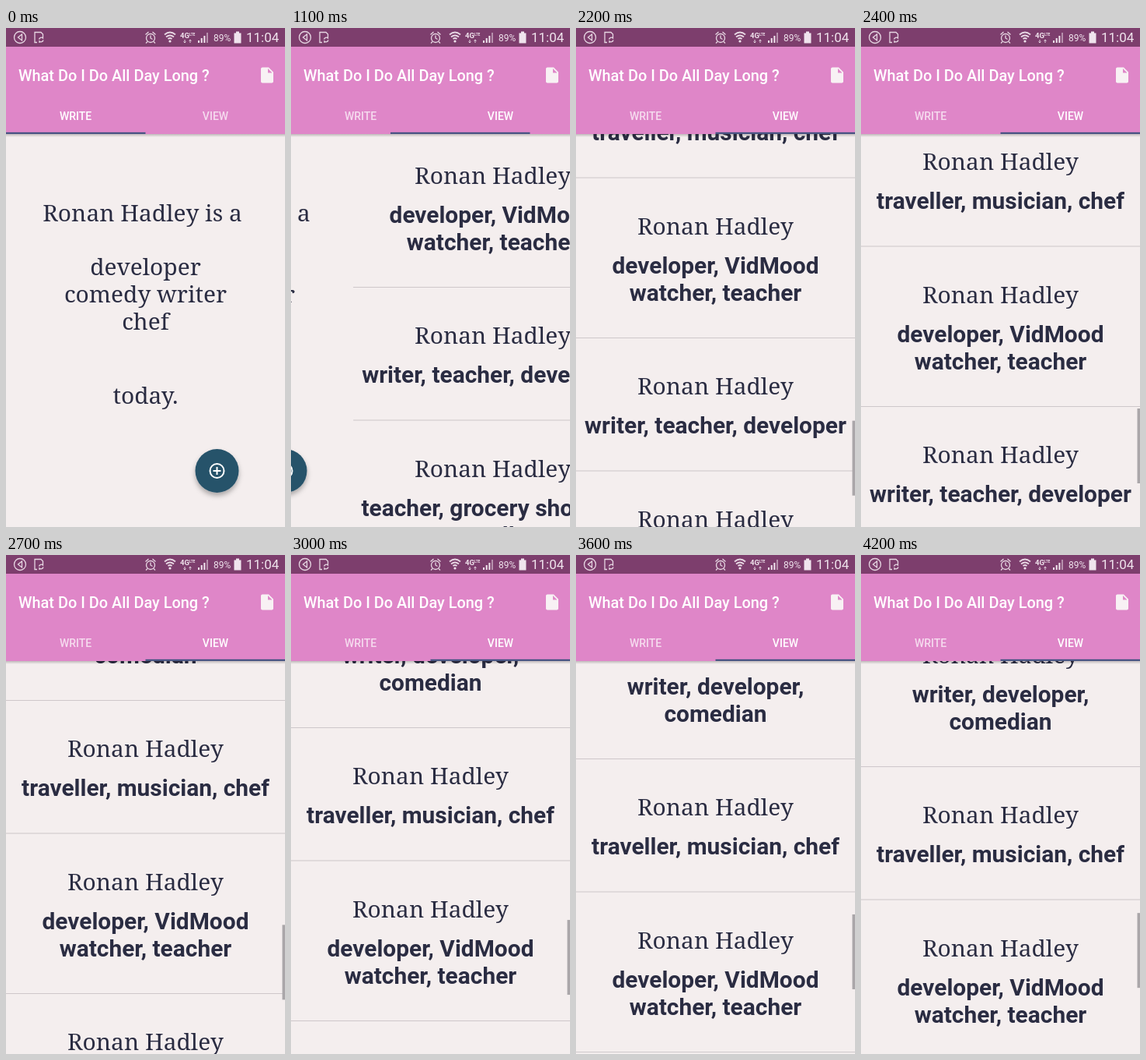
An HTML page that plays this animation: 359x640 px, repeating every 4.3 s.

```html
<!DOCTYPE html>
<html lang="en">
<head>
<meta charset="utf-8">
<title>What Do I Do All Day Long ?</title>
<style>
  html, body { margin: 0; width: 100%; height: 100%; overflow: hidden; background: #f4eeee; }
  svg { display: block; width: 100vw; height: 100vh; }
  text { font-family: Roboto, sans-serif; }
  .page text { font-size: 29.9px; fill: #2a2c42; text-anchor: middle; }
  .page .serif { font-family: "Noto Serif", serif; }
  .page .bold { font-weight: 700; }
  .tab { font-size: 14px; font-weight: 500; fill: #fff; text-anchor: middle; }
  .line { fill: none; stroke: #e6d6e2; stroke-width: 1.3; }
  .solid { fill: #f0e4ed; }
</style>
</head>
<body>
<svg viewBox="0 0 359 640">
  <defs>
    <linearGradient id="shade" x2="0" y2="1">
      <stop stop-color="#000" stop-opacity=".22"/>
      <stop offset="1" stop-color="#000" stop-opacity="0"/>
    </linearGradient>
    <filter id="drop" x="-30%" y="-30%" width="160%" height="170%">
      <feDropShadow dx="0" dy="4" stdDeviation="3" flood-opacity=".3"/>
    </filter>
  </defs>
  <rect width="359" height="640" fill="#f4eeee"/>

  <g id="write" class="page">
    <text class="serif" x="175.5" y="247.5">Ronan Hadley is a</text>
    <text class="serif" x="179.5" y="317">developer</text>
    <text class="serif" x="179.5" y="352">comedy writer</text>
    <text class="serif" x="179.5" y="387">chef</text>
    <text class="serif" x="179.5" y="481.5">today.</text>
    <circle cx="271.5" cy="568" r="28" fill="#28536b" filter="url(#drop)"/>
    <path d="M266.5 568h10m-5-5v10" stroke="#fff" stroke-width="2"/>
    <circle cx="271.5" cy="568" r="9" fill="none" stroke="#fff" stroke-width="2"/>
  </g>
  <g id="view" class="page"><g id="list"></g></g>
  <rect id="bar" x="355.5" width="3.5" height="96" fill="#aaa6a9"/>

  <rect y="136" width="359" height="4" fill="url(#shade)"/>
  <rect y="24" width="359" height="112" fill="#df86c8"/>
  <rect width="359" height="24" fill="#7d3e6d"/>
  <text x="16" y="67.5" font-size="19.9" font-weight="500" fill="#fff">What Do I Do All Day Long ?</text>
  <path transform="translate(324 48.5)" fill="#f8f1f4" d="M6 2c-1.1 0-2 .9-2 2v16c0 1.1.9 2 2 2h12c1.1 0 2-.9 2-2V8l-6-6zm7 7V3.5L18.5 9z"/>
  <text id="writeTab" class="tab" x="89.5" y="117.5">WRITE</text>
  <text id="viewTab" class="tab" x="269.5" y="117.5">VIEW</text>
  <rect id="mark" y="133.8" width="179.5" height="2" fill="#37507c"/>

  <!-- status bar -->
  <g class="line">
    <circle cx="18" cy="12" r="7.5"/>
    <path d="M20.5 8l-5 4 5 4z"/>
    <path d="M40 18.500h-3v-13h8l2.500 2.500v3M42.500 14.500a3 3 0 0 1 5-1.500v-2m.5 4.500a3 3 0 0 1-5 1.500v2"/>
    <circle cx="186" cy="13" r="5.500"/>
    <path d="M186 9.500v3.500l2.500 1.500M179.500 8.500l4-3.500m5 0l4 3.500M182 17.500l-2 2m10-2l2 2"/>
    <path d="M204 8.500q7-6 14 0M206 11.500q5-4 10 0M208.500 14q2.500-2 5 0" stroke-width="1.800"/>
    <path d="M230 15v4m-1.500-1.500l1.500 1.500 1.500-1.500M237 19v-4m-1.500 1.500l1.500-1.500 1.500 1.500" stroke-width="1"/>
  </g>
  <g class="solid">
    <circle cx="211" cy="17" r="1.600"/>
    <text x="224" y="12.500" font-size="9.500" font-weight="700">4G</text>
    <text x="236" y="9.500" font-size="4.500" font-weight="700">LTE</text>
    <path d="M247 19v-3h2v3zm3.700 0v-6h2v6zm3.700 0v-9h2v9z"/>
    <path d="M258 19V6h2v13z" opacity=".5"/>
    <text x="267" y="17" font-size="12">89%</text>
    <path d="M293.500 6.500h2.500v-2h4v2h2.500v13h-9z"/>
    <text x="309" y="18" font-size="17">11:04</text>
  </g>
</svg>
<script>
const $ = id => document.getElementById(id);
const LOOP = 4300, STEP = 100;
const person = "Ronan Hadley";

// Each entry: offset in the list, then its lines.
const entries = [
  [-376, "writer, developer,", "comedian"],
  [-170.5, "traveller, musician, chef"],
  [0, "developer, VidMood", "watcher, teacher"],
  [205.5, "writer, teacher, developer"],
  [376, "teacher, grocery shopper,", "traveller"]
];

const label = (kind, y, words) => `<text class="${kind}" x="179.5" y="${y}">${words}</text>`;
$("list").innerHTML = entries.map(([top, ...lines]) =>
  `<rect y="${top - 0.5}" width="359" height="1" fill="#cec7ca"/>` +
  label("serif", top + 72.5, person) +
  lines.map((words, i) => label("bold", top + 122.7 + 35 * i, words)).join("")
).join("");

const pageKeys = [[900, 0], [1000, .25], [1100, .777], [1200, .96], [1300, .995], [1400, 1]];
const markKeys = [[900, 0], [1000, .2], [1100, .713], [1200, .96], [1300, 1]];
const scrollKeys = [[2000, 127], [2100, 150], [2200, 192], [2400, 280], [2600, 340],
  [2800, 373], [3000, 392], [3300, 413], [3600, 432], [3900, 442]];

function at(keys, t) {
  if (t <= keys[0][0]) return keys[0][1];
  for (let i = 1; i < keys.length; i++) {
    const [t0, a] = keys[i - 1], [t1, b] = keys[i];
    if (t <= t1) return a + (b - a) * (t - t0) / (t1 - t0);
  }
  return keys.at(-1)[1];
}

const move = (id, x, y = 0) => $(id).setAttribute("transform", `translate(${x} ${y})`);

function draw(now) {
  const t = Math.floor(now % LOOP / STEP) * STEP;
  const page = at(pageKeys, t) * 359;
  const scroll = at(scrollKeys, t);
  const viewing = t >= 1000;
  move("write", -page);
  move("view", 359 - page);
  move("list", 0, Math.round(scroll));
  move("mark", at(markKeys, t) * 179.5);
  move("bar", 0, 488 - (scroll - 280) * .178);
  $("bar").setAttribute("opacity", t >= 2100 ? 1 : 0);
  $("writeTab").setAttribute("opacity", viewing ? .7 : 1);
  $("viewTab").setAttribute("opacity", viewing ? 1 : .7);
}

const start = performance.now();
function tick() {
  draw(performance.now() - start);
  requestAnimationFrame(tick);
}
tick();
</script>
</body>
</html>
```
